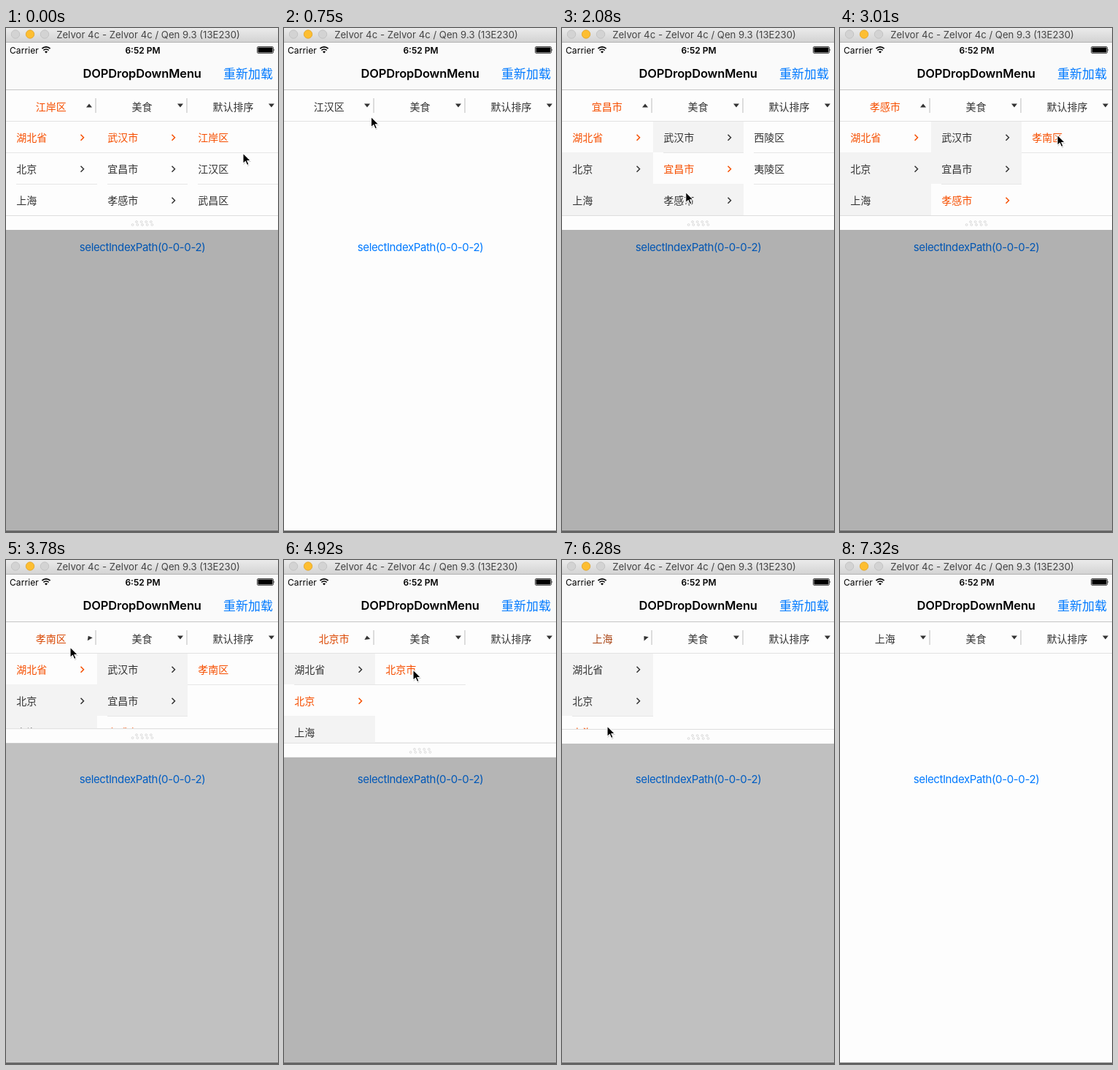
An HTML page that plays this animation: 373x689 px, repeating every 7.76 s.

```html
<!DOCTYPE html>
<html lang="zh">
<head>
<meta charset="utf-8">
<title>DOPDropDownMenu</title>
<style>
html, body { margin: 0; width: 100%; height: 100%; overflow: hidden; background: #fdfdfd; }
svg { display: block; width: 373px; height: 689px; }
text { font-family: Inter, "Noto Sans CJK SC", "Noto Sans CJK", sans-serif; white-space: pre; }
.cjk { font-family: "Noto Sans CJK SC", "Noto Sans CJK", sans-serif; font-size: 14px; fill: #333; }
.mid { text-anchor: middle; }
</style>
</head>
<body>
<svg viewBox="0 0 373 689">
  <defs>
    <linearGradient id="chrome" x2="0" y2="1">
      <stop offset="0" stop-color="#ebebeb"/>
      <stop offset="1" stop-color="#d2d2d2"/>
    </linearGradient>
    <clipPath id="clip"><rect id="clipBox" y="127" width="373"/></clipPath>
  </defs>
  <rect width="373" height="689" fill="#fdfdfd"/>
  <text class="mid" x="187" y="304.5" font-size="15" letter-spacing="-.38" fill="#007aff">selectIndexPath(0-0-0-2)</text>
  <rect id="shade" y="127" width="373" height="560"/>

  <g id="panel">
    <g id="list" clip-path="url(#clip)"></g>
    <g id="foot"></g>
  </g>

  <rect y="85" width="373" height="42" fill="#fdfdfd"/>
  <path d="M0 127.5H373" stroke="#e2e2e2"/>
  <path d="M123 96V116M248 96V116" stroke="#d2d2d2" stroke-width="1.5"/>
  <text id="title" class="cjk" y="112.7"></text>
  <text class="cjk mid" x="186.5" y="112.7">美食</text>
  <text class="cjk mid" x="311.5" y="112.7">默认排序</text>
  <path id="arrow" d="M-4-2.5H4L0 2.5Z" fill="#333"/>
  <path d="M235 103.5h8l-4 5zM360 103.5h8l-4 5z" fill="#333"/>

  <rect y="20" width="373" height="64" fill="#fafafa"/>
  <path d="M0 84.5H373" stroke="#c6c6c6"/>
  <text x="5" y="34.5" font-size="12" letter-spacing=".1">Carrier</text>
  <g fill="none" stroke="#000" stroke-width="1.7">
    <path d="M49.4 28.2a8 8 0 0 1 11.2 0M51.4 30.5a5.1 5.1 0 0 1 7.2 0"/>
    <path d="M55 34.6l-2-2.1a2.8 2.8 0 0 1 4 0z" fill="#000" stroke="none"/>
  </g>
  <text class="mid" x="187.5" y="34.5" font-size="12" font-weight="600">6:52 PM</text>
  <rect x="344.5" y="25.5" width="22" height="9" rx="1.5" fill="#fff" stroke="#000" stroke-width=".7"/>
  <rect x="345.5" y="26.5" width="20" height="7" rx=".7"/>
  <path d="M367.5 28.3q1.6 1.7 0 3.4z"/>
  <text class="mid" x="186.7" y="68" font-size="16.5" font-weight="600" letter-spacing="-.15">DOPDropDownMenu</text>
  <text class="cjk" x="298" y="68.5" style="font-size:17px;fill:#007aff">重新加载</text>

  <rect width="373" height="20" fill="url(#chrome)"/>
  <path d="M0 19.5H373" stroke="#b4b4b4"/>
  <g stroke-width=".8">
    <circle cx="13" cy="8.5" r="5.7" fill="#d3d3d3" stroke="#bdbdbd"/>
    <circle cx="33" cy="8.5" r="5.7" fill="#fdbe31" stroke="#dfa023"/>
    <circle cx="53" cy="8.5" r="5.7" fill="#d3d3d3" stroke="#bdbdbd"/>
  </g>
  <text class="mid" x="195" y="13.7" font-size="13.2" fill="#444">Zelvor 4c - Zelvor 4c / Qen 9.3 (13E230)</text>
  <path d="M0 688H373" stroke="#666" stroke-width="2"/>

  <g id="cursor">
    <path d="M0 0V14.5L3.4 11.4L5.7 16.6L8.1 15.6L5.9 10.5H10.6Z" transform="translate(.6 1.4)" fill-opacity=".2"/>
    <path d="M0 0V14.5L3.4 11.4L5.7 16.6L8.1 15.6L5.9 10.5H10.6Z" stroke="#fff" stroke-width="1.1"/>
  </g>
</svg>
<script>
const LOOP = 7760, TOP = 127, ROW = 43, FULL = 129, COL = 124.7;
const ORANGE = [246, 79, 0], DARK = [51, 51, 51];
const $ = id => document.getElementById(id);
const lerp = (a, b, p) => a + (b - a) * p;
const clamp = p => Math.min(1, Math.max(0, p));
const rgb = c => `rgb(${c.map(Math.round)})`;

// Cubic timing curve, solved by bisection
function bezier(x1, y1, x2, y2) {
  const at = (a, b, s) => 3 * a * s * (1 - s) ** 2 + 3 * b * s * s * (1 - s) + s ** 3;
  return p => {
    p = clamp(p);
    if (p === 0 || p === 1) return p;
    let lo = 0, hi = 1;
    for (let i = 0; i < 20; i++) {
      const s = (lo + hi) / 2;
      if (at(x1, x2, s) < p) lo = s; else hi = s;
    }
    return at(y1, y2, lo);
  };
}
const easeInOut = bezier(.42, 0, .58, 1);
const easeTurn = bezier(.4, 0, .2, 1);
const easeSoft = bezier(.25, .1, .25, 1);

const provinces = ['湖北省', '北京', '上海'];
const cities = ['武汉市', '宜昌市', '孝感市'];
const wuhan = ['江岸区', '江汉区', '武昌区'];
const yichang = ['西陵区', '夷陵区'];
const xiaogan = ['孝南区'];

// Menu contents after each tap: title, three lists, selected rows
const states = [
  { t: 0, title: '江岸区', lists: [provinces, cities, wuhan], sel: [0, 0, 0], plain: true },
  { t: 430, title: '江汉区', lists: [provinces, cities, wuhan], sel: [0, 0, 1], plain: true },
  { t: 1070, title: '江汉区', lists: [provinces, cities, wuhan], sel: [0, 0, 1] },
  { t: 1800, title: '宜昌市', lists: [provinces, cities, yichang], sel: [0, 1, -1] },
  { t: 2360, title: '孝感市', lists: [provinces, cities, xiaogan], sel: [0, 2, -1] },
  { t: 3005, title: '孝感市', lists: [provinces, cities, xiaogan], sel: [0, 2, 0] },
  { t: 3025, title: '孝南区', lists: [provinces, cities, xiaogan], sel: [0, 2, 0] },
  { t: 4280, title: '北京', lists: [provinces, ['北京市'], []], sel: [1, -1, -1] },
  { t: 4890, title: '北京市', lists: [provinces, ['北京市'], []], sel: [1, 0, -1] },
  { t: 6220, title: '上海', lists: [provinces, [], []], sel: [2, -1, -1] }
];

// Times at which the panel starts to open (1) or close (0)
const toggles = [[-1000, 1], [430, 0], [1070, 1], [3025, 0], [3643, 1], [4890, 0], [5491, 1], [6220, 0]];

// Pointer stops: time, x, y
const stops = [
  [20, 325, 171], [190, 303, 190], [520, 303, 190], [830, 84, 108],
  [1070, 84, 108], [1240, 137, 145], [1550, 166, 190], [1830, 166, 190],
  [2130, 170, 227], [2400, 170, 227], [2750, 298, 146], [3080, 298, 146],
  [3400, 76, 110], [3660, 76, 110], [3780, 88, 119], [4060, 62, 188],
  [4320, 62, 188], [4690, 177, 150], [4930, 177, 150], [5240, 72, 108],
  [5480, 72, 108], [5560, 75, 112], [5990, 62, 227], [6330, 62, 227],
  [6850, 225, 496], [7060, 225, 496], [7310, 347, 692]
];

const last = (items, test) => items.reduce((found, it, i) => test(it) ? i : found, 0);
const line = (x, y, end, color) => `<path d="M${x} ${y}H${end}" stroke="${color}"/>`;

function drawList(s) {
  let out = `<rect y="${TOP}" width="373" height="${FULL}" fill="#fdfdfd"/>`;
  s.lists.forEach((names, c) => {
    const x = Math.round(c * COL), end = Math.round((c + 1) * COL);
    names.forEach((name, r) => {
      const on = s.sel[c] === r, y = TOP + r * ROW;
      const deep = c === 0 ? r < 2 : c === 1 && names.length > 1;
      const color = on ? rgb(ORANGE) : '#333';
      if (!on && !s.plain && (c === 0 || deep))
        out += `<rect x="${x}" y="${y}" width="${end - x}" height="${ROW}" fill="#f3f3f3"/>`;
      out += line(on ? x : x + 14, y + ROW + .5, end, '#e6e6e6');
      out += `<text class="cjk" x="${x + 14.3}" y="${y + 27.8}" style="fill:${color}">${name}</text>`;
      if (deep)
        out += `<path d="M${x + 102.5} ${y + 18.7}l4 4-4 4" fill="none" stroke="${color}" stroke-width="1.5"/>`;
    });
  });
  $('list').innerHTML = out;
}

function drawFoot() {
  let out = '<rect width="373" height="20" fill="#fdfdfd"/>' + line(0, .5, 373, '#dedede');
  for (let i = 0; i < 9; i++) {
    const upper = i < 4, x = upper ? 179 + i * 6.6 : 173.6 + (i - 4) * 6.7;
    out += `<circle cx="${x}" cy="${upper ? 9 : 13}" r="1.4" fill="none" stroke="#d6d6d6" stroke-width=".9"/>`;
  }
  $('foot').innerHTML = out;
}

const titleLeft = name => 61.7 - name.length * 7;

function pointerAt(t) {
  const i = last(stops, s => s[0] <= t), a = stops[i], b = stops[i + 1];
  if (!b || t < a[0]) return a.slice(1);
  const p = (t - a[0]) / (b[0] - a[0]), e = p * p * (3 - 2 * p);
  return [lerp(a[1], b[1], e), lerp(a[2], b[2], e)];
}

let shown = -1;
function update(t) {
  const n = last(states, s => s.t <= t), s = states[n];
  if (n !== shown) {
    drawList(s);
    $('title').textContent = s.title;
    shown = n;
  }

  const [start, open] = toggles[last(toggles, g => g[0] <= t)];
  const progress = (ease, ms) => {
    const p = ease((t - start) / ms);
    return open ? p : 1 - p;
  };
  const drop = progress(easeInOut, 200), height = FULL * drop;
  $('panel').style.display = drop > 0 ? '' : 'none';
  $('clipBox').setAttribute('height', height);
  $('foot').setAttribute('transform', `translate(0 ${TOP + height})`);
  $('shade').setAttribute('fill-opacity', .3 * drop);
  $('arrow').setAttribute('transform', `translate(114 106) rotate(${180 * progress(easeTurn, 250)})`);

  const tint = progress(easeSoft, 250);
  $('title').style.fill = rgb(DARK.map((d, i) => lerp(d, ORANGE[i], tint)));
  const from = states[Math.max(0, n - 1)].title;
  $('title').setAttribute('x', lerp(titleLeft(from), titleLeft(s.title), easeInOut((t - s.t) / 250)));

  $('cursor').setAttribute('transform', `translate(${pointerAt(t)})`);
}

drawFoot();
const began = performance.now();
function frame() {
  update((performance.now() - began) % LOOP);
  requestAnimationFrame(frame);
}
frame();
</script>
</body>
</html>
```
